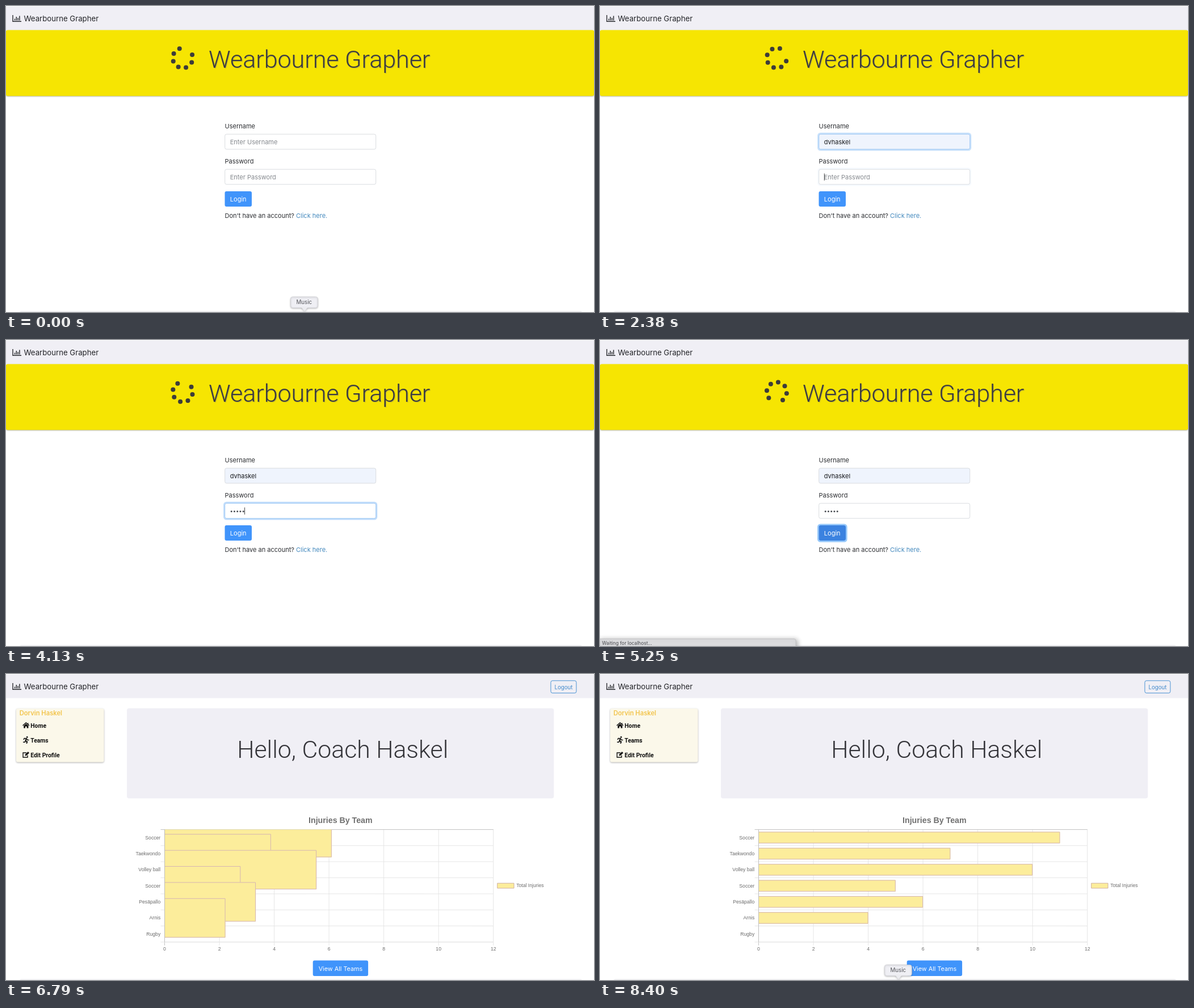
Animation of 1036x540 px, one loop 8.47 s. Source, as an HTML page with a canvas:

```html
<!DOCTYPE html>
<html lang="en">
<head>
<meta charset="utf-8">
<title>Wearbourne Grapher</title>
<style>
  html, body { margin: 0; width: 100%; height: 100%; overflow: hidden; background: #fff; }
  canvas { display: block; }
</style>
</head>
<body>
<canvas id="stage" width="1036" height="540"></canvas>
<script>
const ctx = document.getElementById('stage').getContext('2d');
const LOOP = 8470;
const BRAND = 'Wearbourne Grapher';
const UI = 'Inter, sans-serif', DISPLAY = 'Roboto, sans-serif', CHART = '"Liberation Sans", sans-serif';
const BLUE = '#4094fb', PANEL = '#f0eff5', INK = '#2b2d31';

const T = { tipOff: 700, userFocus: 1050, userFill: 1750, passFocus: 2360, typing: 2900, keyGap: 210,
            login: 4950, waiting: 5180, blank: 5320, dash: 5460, wide: 6300, data: 6608, dotOn: 7000, dotOff: 7350, tipOn: 7700 };

// Spinner angle in degrees (position of the missing dot)
const SPIN = [[0, -64], [2380, 333], [4130, 644], [5250, 818], [5400, 843]];

const TEAMS = [['Soccer', 11], ['Taekwondo', 7], ['Volley ball', 10], ['Soccer', 5],
               ['Pesäpallo', 6], ['Arnis', 4], ['Rugby', 0]];

const clamp = v => Math.max(0, Math.min(1, v));

function text(str, x, y, font, color, align = 'left') {
  ctx.font = font;
  ctx.fillStyle = color;
  ctx.textAlign = align;
  ctx.fillText(str, x, y);
}

function box(x, y, w, h, fill, { r = 0, stroke, line = 1 } = {}) {
  ctx.beginPath();
  ctx.roundRect(x, y, w, h, r);
  if (fill) { ctx.fillStyle = fill; ctx.fill(); }
  if (stroke) { ctx.strokeStyle = stroke; ctx.lineWidth = line; ctx.stroke(); }
}

function path(points, color, width = 1, fill) {
  ctx.beginPath();
  points.forEach(([x, y]) => ctx.lineTo(x, y));
  if (fill) { ctx.fillStyle = fill; ctx.fill(); }
  if (color) { ctx.strokeStyle = color; ctx.lineWidth = width; ctx.stroke(); }
}

function dot(x, y, r, color) {
  ctx.beginPath();
  ctx.arc(x, y, r, 0, 7);
  ctx.fillStyle = color;
  ctx.fill();
}

function withShadow(color, blur, dx, dy, draw) {
  ctx.save();
  Object.assign(ctx, { shadowColor: color, shadowBlur: blur, shadowOffsetX: dx, shadowOffsetY: dy });
  draw();
  ctx.restore();
}

function header(width) {
  box(0, 1, width, 41.5, PANEL);
  path([[12, 16], [12, 27.3], [27, 27.3]], INK, 1.4);
  [[15.5, 22.5], [18.3, 19], [21.1, 21], [23.9, 17.5]].forEach(([x, y]) => path([[x, 25.5], [x, y]], INK, 1.5));
  text(BRAND, 31.5, 27.4, '13.2px ' + UI, '#212226');
}

function spinner(t) {
  const i = SPIN.findIndex(([time]) => time > t);
  const [t0, a0] = SPIN[i - 1], [t1, a1] = SPIN[i];
  const gap = a0 + (a1 - a0) * (t - t0) / (t1 - t0);
  for (let k = 1; k < 8; k++) {
    const a = (gap + 45 * k) * Math.PI / 180;
    dot(311.4 + 17.6 * Math.cos(a), 91.8 + 17.6 * Math.sin(a), 4, '#3d3c3a');
  }
}

function field(y, focus, fill) {
  if (focus) {
    ctx.globalAlpha = focus;
    box(384.3, y - 1.2, 268.8, 29.4, null, { r: 4, stroke: '#bfdcfb', line: 2.4 });
    ctx.globalAlpha = 1;
  }
  box(385.7, y + .2, 266, 26.6, fill, { r: 3, stroke: focus > .3 ? '#93c1f2' : '#d5d8dd', line: .9 });
}

function loginPage(t) {
  const fade = (from, to) => clamp((t - from) / 150) * (1 - clamp((t - to) / 150));
  header(1036);
  withShadow('rgba(90,90,60,.45)', 2, 0, 1, () => box(0, 42.5, 1036, 116.3, '#f6e502', { r: 3 }));
  spinner(t);
  withShadow('rgba(110,110,110,.4)', 1, 1, 1, () =>
    text(BRAND, 357, 108.5, '300 43px ' + DISPLAY, '#3a3a42'));

  const font = '11px ' + UI, hint = '#85898e';
  const filled = t >= T.userFill;
  text('Username', 385.5, 216, font, INK);
  field(226, fade(T.userFocus, T.passFocus), filled ? '#eff4fd' : '#fff');
  text(filled ? 'dvhaskel' : 'Enter Username', 394.7, 244, font, filled ? '#16181b' : hint);

  const typed = Math.max(0, Math.min(5, Math.floor((t - T.typing) / T.keyGap) + 1));
  text('Password', 385.5, 278, font, INK);
  field(288, fade(T.passFocus, T.login), '#fff');
  if (!typed) text('Enter Password', 394.7, 306, font, hint);
  for (let i = 0; i < typed; i++) dot(397.2 + 5.25 * i, 302.6, 1.5, '#4b4f55');
  if (t >= T.passFocus && t < T.login) {
    const x = typed ? 394.8 + 5.15 * typed : 395.3;
    path([[x, 295.5], [x, 308]], '#333', .9);
  }

  const pressed = fade(T.login, LOOP);
  if (pressed) box(384.3, 325.7, 50, 29.7, null, { r: 4, stroke: `rgba(150,200,250,${pressed})`, line: 2.6 });
  box(385.5, 327, 47.5, 27, pressed ? '#3b82e0' : BLUE, { r: 3 });
  text('Login', 409.2, 345, font, '#fff', 'center');
  text("Don't have an account?", 385.5, 374.2, font, INK);
  text('Click here.', 511, 374.2, font, '#4288bd');
}

function statusBar() {
  withShadow('rgba(0,0,0,.3)', 9, 3, 1, () => box(-3, 527.5, 348, 16, '#dedee0', { r: 3, stroke: '#bdbdc0', line: .8 }));
  text('Waiting for localhost...', 3.5, 537.8, '8.4px ' + UI, '#46474b');
}

function sidebar() {
  withShadow('rgba(0,0,0,.32)', 3, 0, 1, () => box(18, 61, 154.5, 94.5, '#fbf8ea', { r: 3 }));
  text('Dorvin Haskel', 23.7, 73.2, '600 11.2px ' + UI, '#f2c44c');
  const ink = '#111', font = 'bold 10.4px ' + DISPLAY;
  // House
  path([[29.5, 91], [35.3, 86], [41, 91]], ink, 1.5);
  path([[31.2, 91.3], [35.3, 87.8], [39.4, 91.3], [39.4, 95.6], [36.6, 95.6], [36.6, 92.6], [34, 92.6], [34, 95.6], [31.2, 95.6]], null, 0, ink);
  path([[38.8, 86.5], [38.8, 89]], ink, 1.4);
  // Runner
  dot(37.2, 111.4, 1.4, ink);
  path([[31, 116], [32.2, 113.5], [36, 113.8], [38, 116.4], [40.5, 116.4]], ink, 1.5);
  path([[35.8, 114], [34.3, 117.8], [37.2, 119.5], [36.2, 122.8]], ink, 2);
  path([[34.2, 118.5], [33.2, 120.3], [30, 120.3]], ink, 1.6);
  // Pencil on sheet
  path([[36, 139], [30, 139], [30, 147], [38, 147], [38, 143.5]], ink, 1.4);
  path([[33.4, 144.2], [34, 141.8], [38.8, 137], [41, 139.2], [36, 144]], null, 0, ink);
  text('Home', 43.2, 94.5, font, ink);
  text('Teams', 43.2, 120.5, font, ink);
  text('Edit Profile', 43.2, 146.5, font, ink);
}

function bars(t, left, right, top, bottom) {
  const row = (bottom - top) / TEAMS.length;
  const rest = (1 - clamp((t - T.data) / 1000)) ** 4;
  ctx.save();
  ctx.beginPath();
  ctx.rect(left, top, right - left, bottom - top);
  ctx.clip();
  TEAMS.forEach(([, value], i) => {
    const w = (right - left) * value / 12 * (1 - rest), h = 20.4 + 110 * rest;
    const y = top + row * (i + .5) - h / 2;
    if (w < 1) return;
    box(left, y, w, h, '#fced9b');
    path([[left, y + .5], [left + w - .5, y + .5], [left + w - .5, y + h - .5], [left, y + h - .5]], '#d5b5b2', 1);
  });
  ctx.restore();
}

function chart(t, left, right, shift) {
  const top = 274.5, bottom = 473, font = '8.64px ' + CHART;
  const grid = '#e4e4e4', zero = '#bdbdbd', grey = '#6d6d6d';
  const loaded = t >= T.data;
  const ticks = loaded ? 6 : 10;
  text('Injuries By Team', 558.5 + shift * .79, 263.2, 'bold 14.2px ' + CHART, '#707070', 'center');

  for (let i = 0; i <= ticks; i++) {
    const x = left + (right - left) * i / ticks;
    path([[x, top], [x, bottom + 6]], i ? grid : zero, .9);
    text(loaded ? 2 * i : i === 0 ? '0' : (i / 10).toFixed(1), x, 488.3, font, grey, 'center');
  }
  path([[left, bottom], [right, bottom]], grid, .9);

  if (loaded) {
    const row = (bottom - top) / TEAMS.length;
    TEAMS.forEach(([name], i) => {
      const y = top + row * i;
      path([[left - 7, y], [right, y]], i ? grid : zero, .9);
      text(name, left - 7.3, y + row / 2 + 2.9, font, grey, 'right');
    });
    path([[left - 7, bottom], [right, bottom]], grid, .9);
    bars(t, left, right, top, bottom);
    path([[left, top], [left, bottom]], zero, .9);
  }

  box(826.7 + shift, 369.2, 29.3, 8.8, '#fced9b', { stroke: '#cfb09f', line: 1 });
  text('Total Injuries', 860.2 + shift, 376.4, font, grey);
}

function editorStrip() {
  box(998.5, 0, 38, 540, '#2e2e2f');
  box(998.5, 318, 38, 209, '#333334');
  path([[998.5, 318], [1036, 318]], '#555', 1);
  path([[998.5, 15.5], [1030, 15.5]], '#34506b', 1);
  box(1020, 12, 9, 2.5, '#c8c8c8');
  box(1023, 8, 3, 11, '#a5a5a5');
  box(1031, 95, 3, 6, '#bbb');
  box(1030, 112, 5.5, 2, '#bbb');
  box(1032, 112, 2, 6, '#aaa');
  box(1030.5, 344, 5.5, 142, '#59595a');
  box(1022.5, 486, 7, 39, '#626263');
  path([[1007.5, 327], [1013.5, 333]], '#ddd', 1);
  path([[1013.5, 327], [1007.5, 333]], '#ddd', 1);
  const font = '8.4px "DejaVu Sans Mono", monospace';
  [['ty', 351, 1009.5], ['js', 381], ['d,', 401, 1008.5], ['e e', 411], ['ht', 421], ['js', 431]].forEach(([word, y, x = 1014.3]) => {
    const link = word === 'js';
    text(word, x, y, font, link ? '#f3ee45' : '#e6e6e6', 'right');
    if (link) path([[1004, y + 2], [1014.3, y + 2]], '#f3ee45', 1);
  });
  box(998.5, 527, 38, 13, '#2389d8');
  path([[1009.5, 536.5], [1011, 534.5], [1011.3, 531.5], [1013.5, 530], [1015.7, 531.5], [1016, 534.5], [1017.5, 536.5], [1009.5, 536.5]], '#fff', .9);
  path([[1012.5, 538], [1014.5, 538]], '#fff', 1);
}

function dashboard(t) {
  const wide = t >= T.wide, shift = wide ? 39 : 0;
  header(wide ? 1036 : 998.5);
  box(920.9 + shift, 11.8, 45, 21.8, null, { r: 3, stroke: '#4a93d4', line: 1 });
  text('Logout', 943.4 + shift, 26.8, '9.7px ' + UI, '#4189cb', 'center');
  sidebar();
  const [x0, x1] = wide ? [213, 965.3] : [191, 926.5];
  box(x0, 60.5, x1 - x0, 159, PANEL, { r: 4 });
  text('Hello, Coach Haskel', (x0 + x1) / 2 - 182, 147.6, '300 42.8px ' + DISPLAY, '#343439');
  chart(t, wide ? 279.5 : 213, wide ? 858.7 : 820, shift);
  const bx = wide ? 540.7 : 509.8;
  box(bx, 505.4, 97.4, 27.6, BLUE, { r: 3 });
  text('View All Teams', bx + 48.7, 523.5, '10.8px ' + UI, '#fff', 'center');
}

function dock(t) {
  const open = t < T.tipOff || t >= T.tipOn;
  box(24, 538.2, 991, 6, open ? '#ededf0' : '#f1f1f3', { r: 3 });
  if (t >= T.dotOn && t < T.dotOff) dot(518.5, 537.5, 4.2, '#45b5e6');
  if (!open) return;
  withShadow('rgba(0,0,0,.22)', 3, 0, 1, () => {
    path([[519.5, 532.5], [526, 539], [532.5, 532.5]], null, 0, '#e6e6ea');
    box(501.5, 513.3, 47.8, 19.5, '#efeff4', { r: 4, stroke: '#cdcdd2', line: .8 });
  });
  path([[520, 531.5], [526, 538], [532, 531.5]], null, 0, '#ececf0');
  text('Music', 525.3, 526.2, '9.8px ' + UI, '#55565b', 'center');
}

function render() {
  const t = performance.now() % LOOP;
  ctx.fillStyle = '#fff';
  ctx.fillRect(0, 0, 1036, 540);
  if (t < T.blank) loginPage(t);
  else if (t < T.dash) header(1036);
  else dashboard(t);
  dock(t);
  if (t >= T.waiting && t < T.blank) statusBar();
  if (t >= T.dash && t < T.wide) editorStrip();
  requestAnimationFrame(render);
}
render();
</script>
</body>
</html>
```
